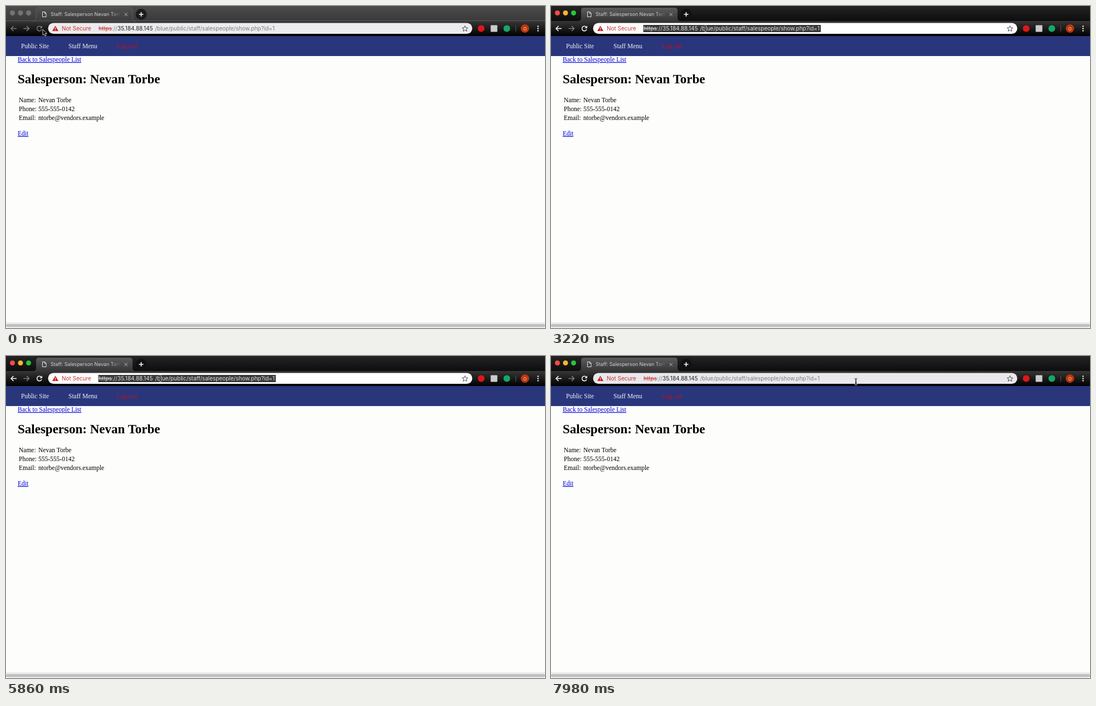
An HTML page for the animation above (8 s loop, 967 px wide and 579 px high).

```html
<!DOCTYPE html>
<html lang="en">
<head>
<meta charset="utf-8">
<title>Salesperson page</title>
<style>
  html, body { margin: 0; width: 100%; height: 100%; overflow: hidden; background: #fdfdfb; }
  svg { display: block; width: 967px; height: 579px; }
  .ui { font-family: Inter, Roboto, sans-serif; font-size: 10px; }
  .page { font-family: "Liberation Serif", "Times New Roman", serif; font-size: 11.5px; }
  .link { fill: #0000e0; text-decoration: underline; }
  .strike { text-decoration: line-through; }
  .line { fill: none; stroke: currentColor; stroke-width: 1.5; }

  /* Hard state changes: window wakes 23%, address selected 32%, reload 73.75%, done 86.25% */
  .idle, .awake, .wake, .bar, .selected, .loading, .settled, .secure, .address {
    animation: 8s step-end infinite;
  }
  .idle { animation-name: idle; }
  .awake { animation-name: awake; }
  .wake { animation-name: wake; }
  .bar { animation-name: bar; }
  .selected { animation-name: selected; }
  .loading { animation-name: loading; }
  .settled { animation-name: settled; }
  .address { animation-name: address; }
  .pointer { animation: pointer 8s ease-in-out infinite; }
  .spin { transform-origin: 69px 15px; animation: spin 1s linear -.56s infinite; }

  @keyframes idle { 0% { opacity: 1 } 23%, 100% { opacity: 0 } }
  @keyframes awake { 0% { opacity: 0 } 23%, 100% { opacity: 1 } }
  @keyframes wake { 0% { color: #777 } 23%, 100% { color: #fff } }
  @keyframes bar { 0% { fill: #ececee } 23% { fill: #fff } 73.75%, 100% { fill: #e9e8ec } }
  @keyframes selected { 0% { opacity: 0 } 32% { opacity: 1 } 73.75%, 100% { opacity: 0 } }
  @keyframes loading { 0% { opacity: 0 } 73.75% { opacity: 1 } 86.25%, 100% { opacity: 0 } }
  @keyframes settled { 0% { opacity: 1 } 73.75% { opacity: 0 } 86.25%, 100% { opacity: 1 } }
  @keyframes address {
    0% { transform: none } 73.75% { transform: translateX(-69px) } 86.25%, 100% { transform: none }
  }
  @keyframes pointer {
    0%, 1% { transform: translate(66px, 42px) }
    11%, 23% { transform: translate(275px, 40px) }
    26%, 74% { transform: translate(277px, 40px) }
    79%, 85% { transform: translate(280px, 42px) }
    98%, 100% { transform: translate(547px, 46px) }
  }
  @keyframes spin { to { transform: rotate(360deg) } }
</style>
</head>
<body>
<svg viewBox="0 0 967 579">
  <defs>
    <linearGradient id="stripIdle" x2="0" y2="1"><stop stop-color="#4c4c4c"/><stop offset="1" stop-color="#393939"/></linearGradient>
    <linearGradient id="stripAwake" x2="0" y2="1"><stop stop-color="#242424"/><stop offset="1" stop-color="#0d0d0d"/></linearGradient>
    <linearGradient id="tabIdle" x2="0" y2="1"><stop stop-color="#505050"/><stop offset="1" stop-color="#3c3c3c"/></linearGradient>
    <linearGradient id="tabAwake" x2="0" y2="1"><stop stop-color="#5c5c5c"/><stop offset="1" stop-color="#363636"/></linearGradient>
    <linearGradient id="tools" x2="0" y2="1"><stop stop-color="#363636"/><stop offset="1" stop-color="#000"/></linearGradient>
    <linearGradient id="fade" gradientUnits="userSpaceOnUse" x1="188" x2="206"><stop stop-color="#d2d2d2"/><stop offset="1" stop-color="#d2d2d2" stop-opacity="0"/></linearGradient>
    <clipPath id="titleClip"><rect x="78" y="5" width="128" height="20"/></clipPath>
    <path id="tab" d="M48 27Q54 27 54 21V8Q54 3 59 3H222Q227 3 227 8V21Q227 27 233 27Z"/>
  </defs>

  <rect width="967" height="579" fill="#fdfdfb"/>
  <rect y="27" width="967" height="27" fill="url(#tools)"/>

  <g class="awake">
    <rect width="967" height="27" fill="url(#stripAwake)"/>
    <use href="#tab" fill="url(#tabAwake)"/>
    <circle cx="11.5" cy="12.5" r="4.5" fill="#fc4a47"/>
    <circle cx="26" cy="12.5" r="4.5" fill="#fdb52b"/>
    <circle cx="40.5" cy="12.5" r="4.5" fill="#28c53a"/>
    <circle cx="242.500" cy="15" r="10" fill="#111"/>
  </g>
  <g class="idle">
    <rect width="967" height="27" fill="url(#stripIdle)"/>
    <path d="M0 26.500H967" stroke="#5a5a5a"/>
    <use href="#tab" fill="url(#tabIdle)" stroke="#686868" stroke-width=".7"/>
    <g fill="#747474"><circle cx="11.500" cy="12.500" r="4.500"/><circle cx="26" cy="12.500" r="4.500"/><circle cx="40.500" cy="12.500" r="4.500"/></g>
    <circle cx="242.500" cy="15" r="10" fill="#1c1c1c"/>
  </g>

  <!-- Tab contents -->
  <path class="settled" d="M65.500 10.500H69.500L72 13V19.500H65.500ZM69.300 10.500V13.200H72" fill="none" stroke="#e4e4e4"/>
  <g class="loading">
    <circle class="spin" cx="69" cy="15" r="4.500" fill="none" stroke="#ddd" stroke-width="1.500"
      pathLength="360" stroke-dasharray="95 265" stroke-dashoffset="110"/>
  </g>
  <text class="ui" x="80" y="18" style="font-size:8.800px" fill="url(#fade)" clip-path="url(#titleClip)">Staff: Salesperson Nevan Torbe</text>
  <path d="M212.500 12.500L218 18M218 12.500L212.500 18" stroke="#bbb"/>
  <path d="M238.500 15H246.500M242.500 11V19" stroke="#fff" stroke-width="1.600"/>

  <!-- Toolbar -->
  <path class="line wake" d="M19 40.500H9M13.500 36L9 40.500L13.500 45"/>
  <path class="line" color="#808080" d="M31.500 40.500H41.500M37 36L41.500 40.500L37 45"/>
  <g class="settled"><g class="wake">
    <path class="line" d="M63.200 37.700A4.300 4.300 0 1 0 64 42"/>
    <path d="M65 35.500V40H60.500Z" fill="currentColor"/>
  </g></g>
  <path class="line loading" color="#fff" d="M55.800 36.500L63.800 44.500M63.800 36.500L55.800 44.500"/>

  <rect class="bar" x="75.500" y="30.500" width="761" height="19.500" rx="9.750"/>
  <path d="M88.500 35.500L94 45H83Z" fill="#c5221f"/>
  <path d="M88.500 38.800V41.800M88.500 42.800V44" stroke="#fff" stroke-width="1.100"/>
  <g class="ui">
    <text class="settled" x="100" y="44" fill="#c93430">Not Secure</text>
    <g class="address">
      <text y="44" fill="#7d7d82"><tspan class="strike" x="166" fill="#c93430">https</tspan>://<tspan x="200" fill="#202124">35.184.88.145</tspan><tspan x="267.500">/blue/public/staff/salespeople/show.php?id=1</tspan></text>
    </g>
    <g class="selected">
      <rect x="165.500" y="34" width="318.500" height="13" fill="#39393b"/>
      <text y="44" fill="#dedede"><tspan class="strike" x="166">https</tspan>://<tspan x="200">35.184.88.145</tspan><tspan x="267.500">/blue/public/staff/salespeople/show.php?id=1</tspan></text>
    </g>
  </g>
  <path d="M823.500 35.500L825 39L828.700 39.300L825.900 41.700L826.800 45.300L823.500 43.400L820.200 45.300L821.100 41.700L818.300 39.300L822 39Z" fill="none" stroke="#4b4b4b"/>

  <circle cx="852.500" cy="40.500" r="6" fill="#e0161a"/>
  <rect x="869.500" y="34.500" width="12" height="12" rx="1" fill="#cbcbcb"/>
  <circle cx="898.500" cy="40.500" r="6" fill="#16a765"/>
  <path d="M914.500 35V46" stroke="#555"/>
  <circle cx="931" cy="40.500" r="7.500" fill="#bf360c"/>
  <text class="ui" x="931" y="43.500" text-anchor="middle" style="font-size:8px" fill="#f2e4df">O</text>
  <g fill="#eee"><circle cx="954.500" cy="36.500" r="1.300"/><circle cx="954.500" cy="40.500" r="1.300"/><circle cx="954.500" cy="44.500" r="1.300"/></g>

  <!-- Web page -->
  <rect y="54" width="967" height="36" fill="#29367c"/>
  <g class="page">
    <g fill="#f4f4f6">
      <text x="27" y="76">Public Site</text>
      <text x="112" y="76">Staff Menu</text>
      <text x="199" y="76" fill="#c00d24">Log out</text>
    </g>
    <text class="link" x="21" y="100">Back to Salespeople List</text>
    <text x="21" y="139" style="font-size:23px;font-weight:bold">Salesperson: Nevan Torbe</text>
    <text x="23" y="173">Name:</text><text x="58" y="173">Nevan Torbe</text>
    <text x="23" y="189">Phone:</text><text x="58" y="189">555-555-0142</text>
    <text x="23" y="205">Email:</text><text x="58" y="205">ntorbe@vendors.example</text>
    <text class="link" x="21" y="233">Edit</text>
  </g>
  <rect y="569" width="967" height="10" fill="#fafafa"/>
  <path d="M0 569.500H967" stroke="#e0e0de"/>
  <rect y="571.500" width="967" height="6" rx="3" fill="#c1c1c1"/>

  <g class="pointer">
    <path class="idle" d="M0 0V10.500L2.400 8.300L4 12L5.900 11.200L4.300 7.600H7.500Z" fill="#000" stroke="#fff" stroke-width=".8"/>
    <g class="awake" fill="none">
      <path id="beam" d="M-2.500 -5.500Q0 -5.500 0 -4V4Q0 5.500 -2.500 5.500M2.500 -5.500Q0 -5.500 0 -4V4Q0 5.500 2.500 5.500M-1.300 2H1.300" stroke="#fff" stroke-width="2.200" stroke-opacity=".7"/>
      <path d="M-2.500 -5.500Q0 -5.500 0 -4V4Q0 5.500 -2.500 5.500M2.500 -5.500Q0 -5.500 0 -4V4Q0 5.500 2.500 5.500M-1.300 2H1.300" stroke="#111"/>
    </g>
  </g>
</svg>
</body>
</html>
```
